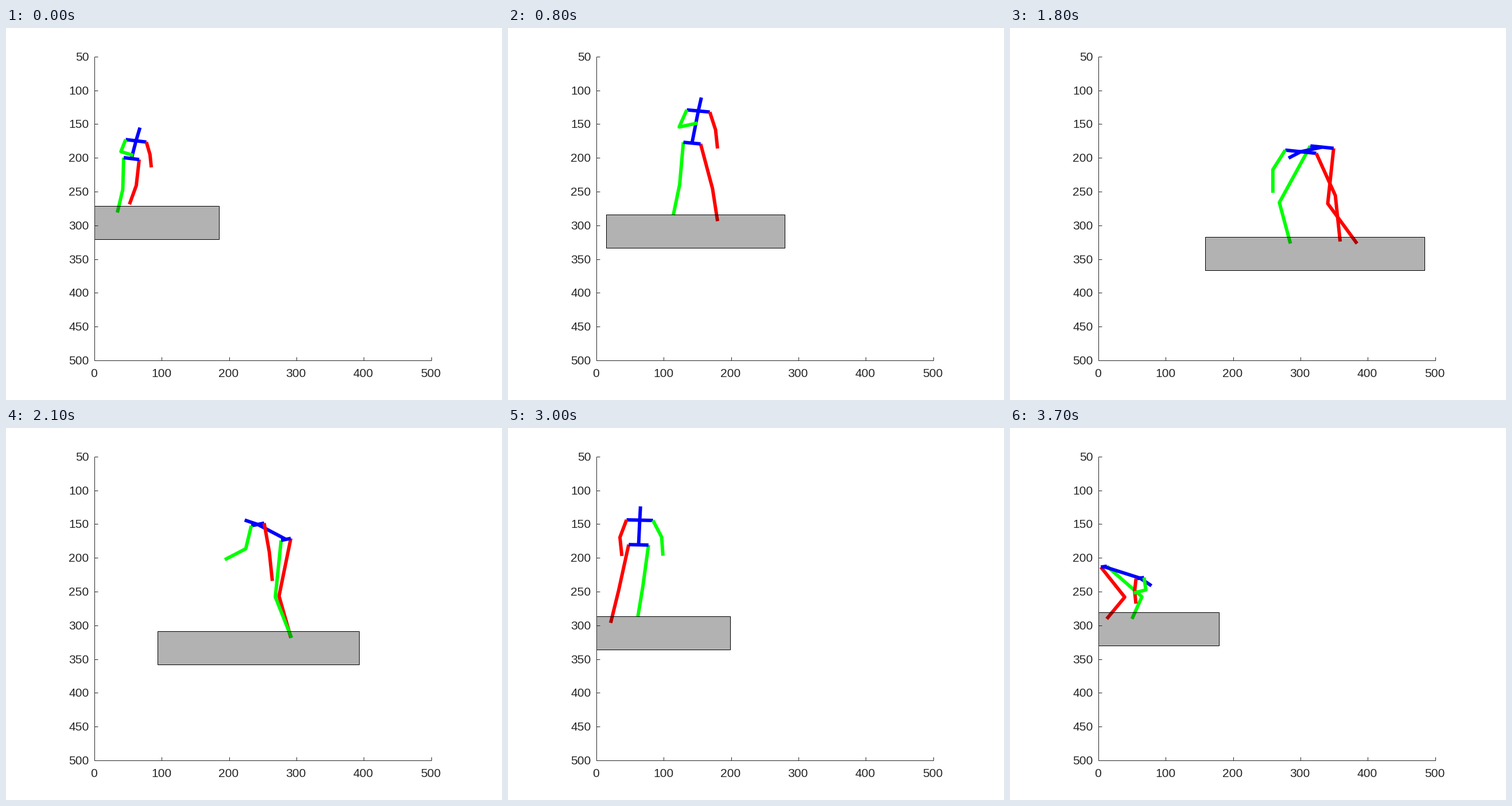
Animation of 864x648 px, one loop 3750 ms. Source, as a matplotlib script:

```python
import numpy as np
import matplotlib.pyplot as plt
from matplotlib.animation import FuncAnimation
from matplotlib.patches import Rectangle

W, H, DPI = 864, 648, 72
FRAMES, STEP = 75, 50
LEFT, RIGHT, TOP, BOTTOM = 154, 740.5, 49.8, 579
UNIT = 1.174                         # pixels per data unit
INK = (0.15, 0.15, 0.15)
GREEN, RED, BLUE = (0, 1, 0), (1, 0, 0), (0, 0, 1)

# The walk: key points of three paths and of the gait, all in pixels.
TIMES = np.array([50, 800, 1300, 1800, 2400, 3000, 3700])
PELVIS = [(218, 227), (320, 200), (451, 206), (543, 207),
          (392, 180), (227, 203), (163, 241)]
NECK = [(226, 196), (331, 144), (423, 137), (506, 215),
        (337, 120), (229, 160), (226, 261)]
FEET = [(204, 321), (326, 336), (494, 369), (546, 375),
        (405, 351), (202, 339), (190, 332)]
STRIDE = [34, 44, 45, 58, -59, -27, -22]        # sign gives the direction
CYCLE = [-1.2, 0.08, 0.93, 1, 1, 2.08, 2]       # gait cycles walked
TURN = [18, 20, 28, 27, -9, -23, -7]            # half width of the shoulders
FOREARM = [73, 102, -33, 0, -125, 4, -76]       # green forearm, degrees

KEYS = np.column_stack([PELVIS, NECK, FEET, STRIDE, CYCLE, TURN, FOREARM])


def key_slopes():
    """Slopes for a cubic that never overshoots its keys."""
    d = np.diff(KEYS, axis=0) / np.diff(TIMES)[:, None]
    a, b = d[:-1], d[1:]
    same = a * b > 0
    mid = np.where(same, 2 * a * b / np.where(same, a + b, 1), 0)
    return np.vstack([d[:1], mid, d[-1:]])


SLOPES = key_slopes()


def state_at(t):
    t = np.clip(t, TIMES[0], TIMES[-1])
    i = min(np.searchsorted(TIMES, t, side="right") - 1, len(TIMES) - 2)
    h = TIMES[i + 1] - TIMES[i]
    u = (t - TIMES[i]) / h
    s = u * u * (3 - 2 * u)
    return (KEYS[i] * (1 - s) + KEYS[i + 1] * s
            + h * u * (1 - u) * (SLOPES[i] * (1 - u) - SLOPES[i + 1] * u))


def down(angle, length):
    """Step of a limb that hangs, turned by the angle towards the right."""
    return length * np.array([np.sin(angle), np.cos(angle)])


def leg(hip, feet, height, lean, stride, cycle):
    phase = 2 * np.pi * cycle
    lift = 0.16 * height * max(0, -np.sin(phase))
    foot = feet + np.array([stride * np.cos(phase), -lift])
    knee = hip + 0.58 * (foot - hip) + np.array([19 * lean, 0])
    return [hip, knee, foot]


def arm(shoulder, length, upper, lower):
    elbow = shoulder + down(np.radians(upper), length)
    return [shoulder, elbow, elbow + down(np.radians(lower), length)]


def pose_at(t):
    s = state_at(t)
    pelvis, neck, feet = s[0:2], s[2:4], s[4:6]
    stride, cycle, turn, forearm = s[6:]
    height = feet[1] - pelvis[1]
    dx, dy = neck - pelvis
    lean = np.arctan2(dx, -dy)
    head = neck - down(-1.15 * lean, 24)
    side = turn * np.array([1, np.sin(2 * lean) / 4])
    hip = 0.75 * side
    # The red arm comes towards the viewer at the deepest bow.
    near = 1 + np.exp(-((t - TIMES[3]) / 250) ** 2)
    return {
        "leg_r": leg(pelvis + hip, feet, height, lean, stride, cycle),
        "leg_g": leg(pelvis - hip, feet, height, lean, stride, cycle + 0.5),
        "hips": [pelvis - hip, pelvis + hip],
        "spine": [pelvis, neck, head],
        "shoulders": [neck - side, neck + side],
        "arm_r": arm(neck + side, 0.24 * height * near, 0.9 * turn, 6),
        "arm_g": arm(neck - side, 0.24 * height, -1.2 * turn, forearm),
    }


fig = plt.figure(figsize=(W / DPI, H / DPI), dpi=DPI, facecolor="white")
ax = fig.add_axes([0, 0, 1, 1])
ax.set_xlim(0, W)
ax.set_ylim(H, 0)
ax.axis("off")


def rule(xs, ys):
    ax.plot(xs, ys, color=INK, lw=1, zorder=6, solid_capstyle="butt")


def label(x, y, value, ha):
    ax.text(x, y, str(value), ha=ha, va="center_baseline", color=INK,
            family="Liberation Sans", fontsize=21)


rule([LEFT, LEFT], [TOP, BOTTOM])
rule([LEFT, RIGHT], [BOTTOM, BOTTOM])
for v in range(0, 501, 100):
    x = LEFT + v * (RIGHT - LEFT) / 500
    rule([x, x], [BOTTOM, BOTTOM - 6])
    label(x - 0.7, 600, v, "center")
for v in range(50, 501, 50):
    y = TOP + (v - 50) * (BOTTOM - TOP) / 450
    rule([LEFT, LEFT + 6], [y, y])
    label(144.5, y - 0.6, v, "right")

COLORS = {"leg_r": RED, "leg_g": GREEN, "hips": BLUE, "spine": BLUE,
          "shoulders": BLUE, "arm_r": RED, "arm_g": GREEN}
lines = {name: ax.plot([], [], color=color, lw=6, zorder=2,
                       solid_capstyle="butt", solid_joinstyle="round")[0]
         for name, color in COLORS.items()}

ground = Rectangle((0, 0), 1, 50 * UNIT, facecolor=(0, 0, 0, 0.302),
                   edgecolor="black", lw=1, zorder=5)
ax.add_patch(ground)
ground.set_clip_path(Rectangle((LEFT, TOP), RIGHT - LEFT, BOTTOM - TOP,
                               transform=ax.transData))


def draw(n):
    pose = {name: np.array(pts) + 0.5 for name, pts in pose_at(n * STEP).items()}
    for name, pts in pose.items():
        lines[name].set_data(pts[:, 0], pts[:, 1])
    # The ground reaches 100 units past the figure, 10 units above its feet.
    joints = np.vstack(list(pose.values()))
    x0 = joints[:, 0].min() - 100 * UNIT
    x1 = joints[:, 0].max() + 100 * UNIT
    floor = max(pose["leg_r"][2, 1], pose["leg_g"][2, 1])
    ground.set_xy((x0, floor - 10 * UNIT))
    ground.set_width(x1 - x0)
    return list(lines.values()) + [ground]


anim = FuncAnimation(fig, draw, frames=FRAMES, interval=STEP, repeat=True)
plt.show()
```
